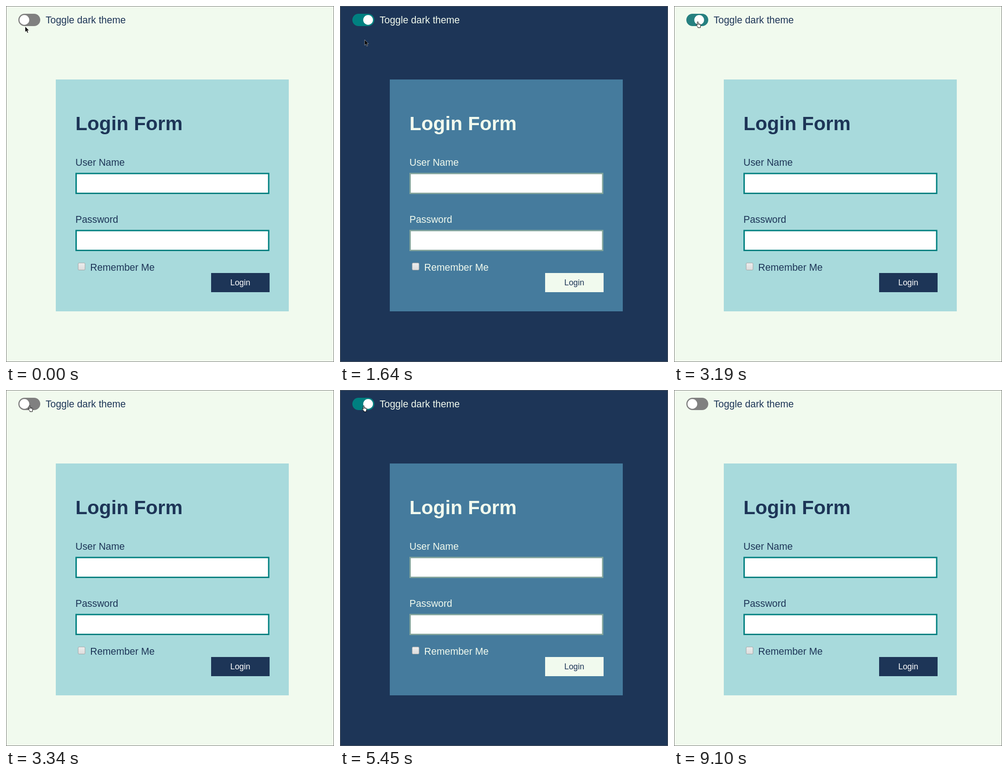
Animation, 718 px wide and 780 px high, one loop 9720 ms. Source, as an HTML page:

```html
<!DOCTYPE html>
<html lang="en">
<head>
<meta charset="utf-8">
<title>Theme toggle</title>
<style>
  html, body { margin: 0; width: 100%; height: 100%; overflow: hidden; }
  svg { display: block; width: 718px; height: 780px; font: 21.33px "Liberation Sans", Arial, sans-serif; }

  .stage, .switch, .cursor { animation: theme 9720ms step-end infinite; }
  .switch { animation-name: slide; }
  .cursor { animation-name: roam; }

  .page { fill: var(--page); }
  .edge { fill: none; stroke: var(--edge); }
  .card { fill: var(--card); }
  .ink { fill: var(--ink); }
  .title { font-size: 42.67px; font-weight: bold; }
  .field { fill: #fff; stroke: var(--field); stroke-width: 3px; }
  .label { font-size: 17.78px; fill: var(--label); text-anchor: middle; }
  .track { fill: rgb(calc(128 - 128 * var(--on)), 128, 128); }
  .knob { fill: #fff; transform: translateX(calc(var(--on) * 21.3px)); }
  .hand { opacity: var(--hand); fill: #fff; stroke: #000; stroke-linejoin: round; }
  .arrow { opacity: calc(1 - var(--hand)); stroke: #fff; stroke-width: .5px; }

  @keyframes theme {
    0%, 32.81%, 81.48%, 100% {
      --page: #f1faee; --card: #a8dadc; --ink: #1d3557;
      --field: #008080; --label: #fff; --edge: #767676;
    }
    5.34%, 52.88% {
      --page: #1d3557; --card: #457b9d; --ink: #f1faee;
      --field: #84a59d; --label: #1d3557; --edge: #555a60;
    }
  }

  @keyframes slide {
    0%, 34.36%, 84.56%, 100% { --on: 0; }
    5.34%, 52.88% { --on: .32; }
    6.79%, 54.42% { --on: .97; }
    8.23%, 56.06% { --on: 1; }
    32.81% { --on: .7; }
    81.48% { --on: .8; }
    82.92% { --on: .08; }
  }

  @keyframes roam {
    0%, 100% { transform: translate(42px, 45px); --hand: 0; opacity: 1; }
    1.33% { transform: translate(45px, 27px); --hand: 1; }
    2.57% { transform: translate(46px, 18px); }
    10.9% { transform: translate(47px, 23px); }
    12.44% { transform: translate(50px, 31px); }
    13.99% { transform: translate(51px, 32.5px); }
    15.53% { transform: translate(57px, 55px); --hand: 0; }
    16.87% { transform: translate(54px, 74px); }
    19.85% { transform: translate(54px, 67px); }
    21.19% { transform: translate(54px, 55px); }
    22.42% { transform: translate(54px, 46px); }
    23.86% { transform: translate(53px, 47px); }
    25.2% { transform: translate(50px, 40.5px); --hand: 1; }
    26.74% { transform: translate(48px, 35px); }
    28.29% { transform: translate(48px, 34px); }
    88.99% { transform: translate(44px, 57px); --hand: 0; }
    90.53% { transform: translate(165px, 355.5px); }
    92.07% { transform: translate(428px, 642px); }
    93.62% { transform: translate(428px, 642px); opacity: 0; }
  }
</style>
</head>
<body>
<svg class="stage" viewBox="0 0 718 780">
  <defs>
    <linearGradient id="box" x2="0" y2="1">
      <stop stop-color="#eee"/>
      <stop offset="1" stop-color="#dcdcdc"/>
    </linearGradient>
  </defs>

  <rect class="page" width="718" height="780"/>
  <rect class="edge" x=".5" y=".5" width="717" height="779"/>

  <g class="switch">
    <rect class="track" x="27" y="17" width="48" height="27" rx="13.5"/>
    <circle class="knob" cx="40.2" cy="30.5" r="10.67"/>
  </g>
  <text class="ink" x="86.7" y="38">Toggle dark theme</text>

  <rect class="card" x="109" y="161" width="510" height="508"/>
  <text class="ink title" x="152" y="272">Login Form</text>
  <text class="ink" x="152" y="350">User Name</text>
  <rect class="field" x="153.5" y="367" width="421.5" height="43.5"/>
  <text class="ink" x="152" y="475">Password</text>
  <rect class="field" x="153.5" y="492" width="421.5" height="43.5"/>

  <rect x="158" y="563" width="15" height="15.5" rx="2" fill="url(#box)" stroke="#a3a3a3"/>
  <text class="ink" x="184.3" y="580">Remember Me</text>

  <rect class="ink" x="449" y="585" width="128" height="42"/>
  <text class="label" x="512.8" y="611.5">Login</text>

  <g class="cursor">
    <g class="hand">
      <path d="M2.9 8.2V1.6a1.1 1.1 0 0 1 2.2 0V5l4.1.8q1.3.3 1.3 1.6l-.8 3.6v2.5H4.3v-1.6L.8 8.4Q.2 7 1.6 7z"/>
      <path d="M5.1 5v2.2M7 5.5v1.9M8.8 5.9v1.7" stroke-width=".6"/>
    </g>
    <path class="arrow" d="M0 0V12L2.8 9.4 4.7 14 6.7 13.2 4.8 8.7H8.4Z"/>
  </g>
</svg>
</body>
</html>
```
